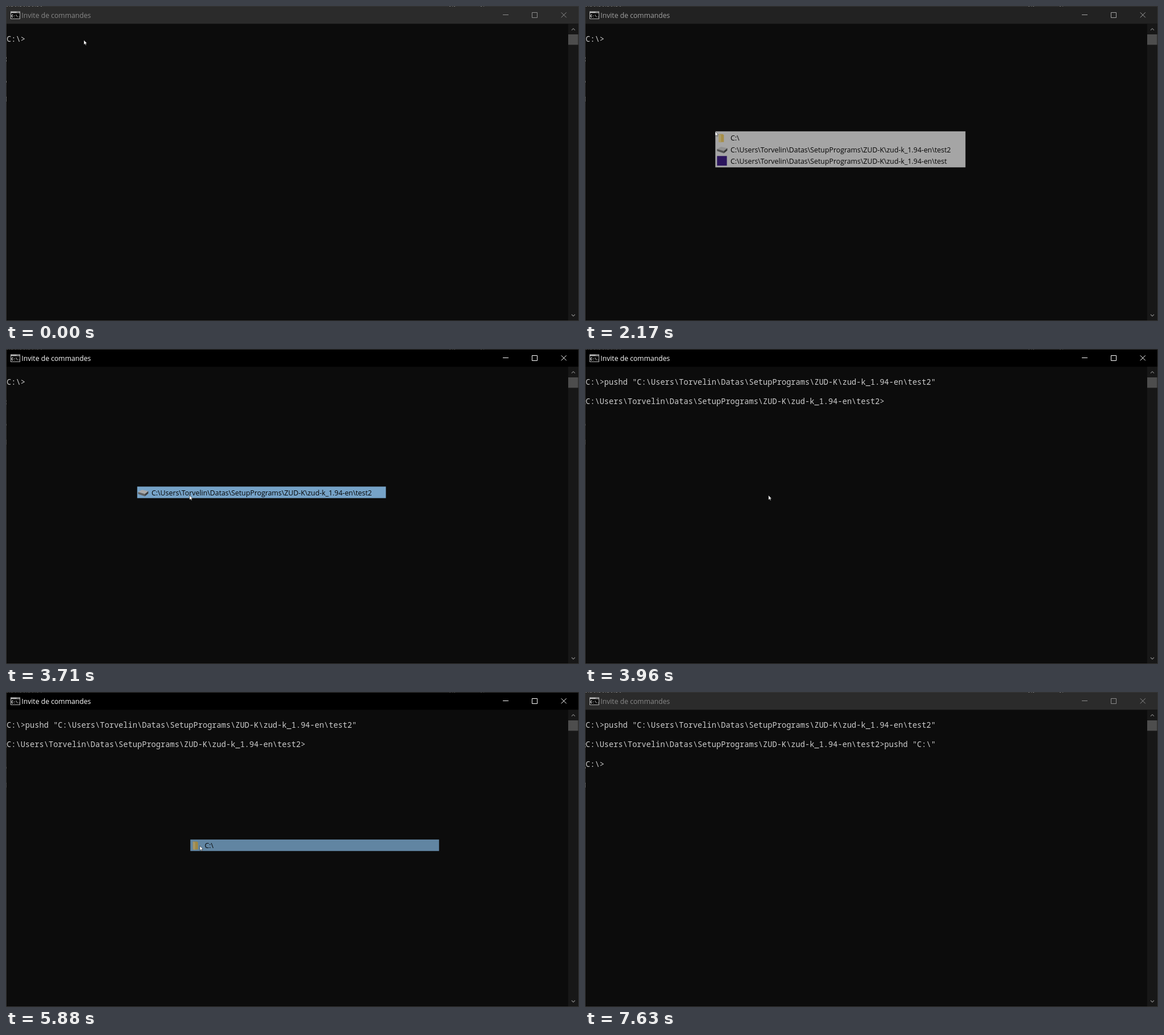
Animation of 1008x555 px, one loop 7.75 s. Source, as an HTML page:

```html
<!DOCTYPE html>
<html lang="fr">
<head>
<meta charset="utf-8">
<title>Invite de commandes</title>
<style>
  html, body { margin: 0; width: 100%; height: 100%; overflow: hidden; background: #0c0c0c; }
  svg { display: block; width: 100%; height: 100%; }
  .ui { font: 12.2px "Open Sans", "Noto Sans", sans-serif; }
  .item { font: 12.35px "Open Sans", "Noto Sans", sans-serif; fill: #000; }
  .console { font: 13.7px "Noto Sans Mono", "DejaVu Sans Mono", monospace; fill: #ccc; }
  .icon { font: bold 6.5px "Liberation Mono", monospace; fill: #fff; }
</style>
</head>
<body>
<svg viewBox="0 0 1008 555" preserveAspectRatio="none">
  <rect width="1008" height="555" fill="#0c0c0c"/>

  <rect id="bar" width="1008" height="31.3"/>
  <g>
    <rect x="8" y="9.5" width="17" height="13.5" fill="#b9b9b9"/>
    <rect x="9" y="12.5" width="15" height="9.5" fill="#000"/>
    <path d="M18.5 11H24" stroke="#555"/>
    <text class="icon" x="9.3" y="19.6" textLength="">C:\.</text>
  </g>
  <text id="title" class="ui" x="27.3" y="21">Invite de commandes</text>
  <path id="buttons" fill="none" d="M874 15.5h10M925.5 11.5h9v9h-9zM976.8 11.3l9 9M985.8 11.3l-9 9"/>

  <rect x="989" y="31.3" width="18" height="523" fill="#171717"/>
  <rect x="989" y="50" width="17.5" height="18.3" fill="#4d4d4d"/>
  <path d="M995 42.7l3-3 3 3M995 543.5l3 3 3-3" fill="none" stroke="#858585" stroke-width="1.1"/>

  <path d="M.5 555V.5H1007.5V554.5H0" fill="none" stroke="#363636"/>
  <g id="fringe" stroke="#999">
    <path d="M1 .5H63M780 .5h10M835 .5h6" stroke-dasharray="2 3 1 2 3 4"/>
    <path d="M.5 90v3m0 2v3M.5 132v3M.5 160v2m0 1v2m0 1v2"/>
  </g>

  <g id="lines" class="console"></g>
  <rect id="caret" width="8.2" height="4.3" x="33.8" fill="#f2f2f2"/>
  <g id="menu"></g>
  <path id="pointer" d="M0 0V8.2L1.9 6.5 3.1 9.2 4.4 8.6 3.2 6H5.6Z" fill="#fff" stroke="#000" stroke-width=".5"/>
</svg>
<script>
const LOOP = 7750, FPS = 24, ROW = 20.3;
const PATH = "C:\\Users\\Torvelin\\Datas\\SetupPrograms\\ZUD-K\\zud-k_1.94-en\\test";
const $ = id => document.getElementById(id);
const clamp = v => Math.max(0, Math.min(1, v));
const mix = (a, b, p) => a + (b - a) * p;
const gray = v => `rgb(${v},${v},${v})`;

// Pointer path: step, x, y
const MOVES = [
  [0, 137, 60], [4, 189, 212], [36, 189, 212], [42, 229, 221], [57, 229, 221],
  [64, 293.3, 257.5], [69, 312, 266], [75, 322.8, 257.5], [123, 322.8, 258],
  [128, 341, 271], [155, 341, 271], [156, 350, 281], [164, 356, 400], [172, 359, 560]
];

// Each menu: first step, fade length, step of the click, chosen row, corner
const MENUS = [
  { open: 49, fade: 6, pick: 89, row: 1, x: 229.3, y: 220.8 },
  { open: 114, fade: 5, pick: 140, row: 0, x: 322.8, y: 258.6 }
];

const FOCUS = [[24, 49], [89, 114], [140, 179]];
const BLINKS = [[37, 49, 62], [156, 169, 131.6]];

// Console output: first step, baseline, text
const OUTPUT = [
  [0, 62.6, "C:\\>"],
  [94, 62.6, `C:\\>pushd "${PATH}2"`],
  [95, 97.4, `${PATH}2>`],
  [146, 97.4, `${PATH}2>pushd "C:\\"`],
  [147, 132.2, "C:\\>"]
];

const ICONS = [
  `<path d="M6 5h7l2 1.5V19H6z" fill="#f3cf63"/><path d="M6 5l4 1.5V20L6 18.5z" fill="#fbe49a"/>`,
  `<path d="M3 11l7-4 11 2.5-6 5z" fill="#d2d2d2"/><path d="M3 11l12 3.5v4L3 14.5z" fill="#777"/>
   <path d="M15 14.5l6-5v4l-6 5z" fill="#4b4b4b"/>`,
  `<rect x="3" y="3" width="17.3" height="17" fill="#3b1a86"/>`
];

const rowHtml = (label, i) => `<g class="row" transform="translate(0 ${1.3 + ROW * i})">
  <rect class="hot" x="1.5" width="437.5" height="${ROW}" fill="#91c9f7"/>
  <g transform="translate(0 -1.4)">${ICONS[i]}</g>
  <text class="item" x="26.7" y="15.4">${label}</text></g>`;

$("menu").innerHTML = `<rect id="panel" width="440" height="63.5" fill="#f2f2f2"/>` +
  ["C:\\", PATH + "2", PATH].map(rowHtml).join("");
$("lines").innerHTML = [62.6, 97.4, 132.2].map(y => `<text x="1" y="${y}"></text>`).join("");
document.querySelector(".icon").removeAttribute("textLength");

const rows = [...document.querySelectorAll(".row")];
const hots = [...document.querySelectorAll(".hot")];
const lines = [...$("lines").children];
const show = (el, on) => el.setAttribute("visibility", on ? "visible" : "hidden");

function pointerAt(k) {
  const i = MOVES.findIndex(m => m[0] > k);
  if (i < 0) return MOVES[MOVES.length - 1].slice(1);
  const [k0, x0, y0] = MOVES[i - 1], [k1, x1, y1] = MOVES[i];
  const p = (k - k0) / (k1 - k0);
  return [mix(x0, x1, p), mix(y0, y1, p)];
}

// Gaining focus is instant, losing it fades
function focusAt(k) {
  return FOCUS.reduce((f, [on, off]) => k < on ? f : k < off ? 1 : clamp(1 - (k - off + 1) / 5), 0);
}

function drawWindow(k) {
  const f = focusAt(k);
  $("bar").setAttribute("fill", gray(mix(43, 0, f)));
  $("title").setAttribute("fill", gray(mix(136, 255, f)));
  $("buttons").setAttribute("stroke", gray(mix(140, 255, f)));
  $("fringe").setAttribute("opacity", mix(.7, .35, f));
}

function drawConsole(k) {
  for (const line of lines) {
    const y = +line.getAttribute("y");
    const last = OUTPUT.filter(o => o[0] <= k && o[1] === y).pop();
    line.textContent = last ? last[2] : "";
  }
  const blink = BLINKS.find(([on, off]) => k >= on && k < off);
  show($("caret"), blink);
  if (blink) $("caret").setAttribute("y", blink[2]);
}

function drawMenu(k, px, py) {
  const m = MENUS.find(m => k >= m.open && k < m.pick + 5);
  const menu = $("menu");
  menu.setAttribute("display", m ? "inline" : "none");
  if (!m) return;
  const picked = k >= m.pick;
  const over = px > m.x + 1.5 ? Math.floor((py - m.y - 1.3) / ROW) : -1;
  const active = picked ? m.row : over;
  menu.setAttribute("transform", `translate(${m.x} ${m.y})`);
  menu.setAttribute("opacity", picked ? .8 - .16 * (k - m.pick) : clamp((k - m.open + 1) / m.fade));
  show($("panel"), !picked);
  rows.forEach((row, i) => {
    const on = !picked || i === active;
    show(row, on);
    show(hots[i], on && i === active);
  });
}

function draw(time) {
  const k = Math.floor((time % LOOP + 5) * FPS / 1000);
  const [x, y] = pointerAt(k);
  drawWindow(k);
  drawConsole(k);
  drawMenu(k, x, y);
  $("pointer").setAttribute("transform", `translate(${x} ${y})`);
}

const start = performance.now();
function tick() {
  draw(performance.now() - start);
  requestAnimationFrame(tick);
}
tick();
</script>
</body>
</html>
```
